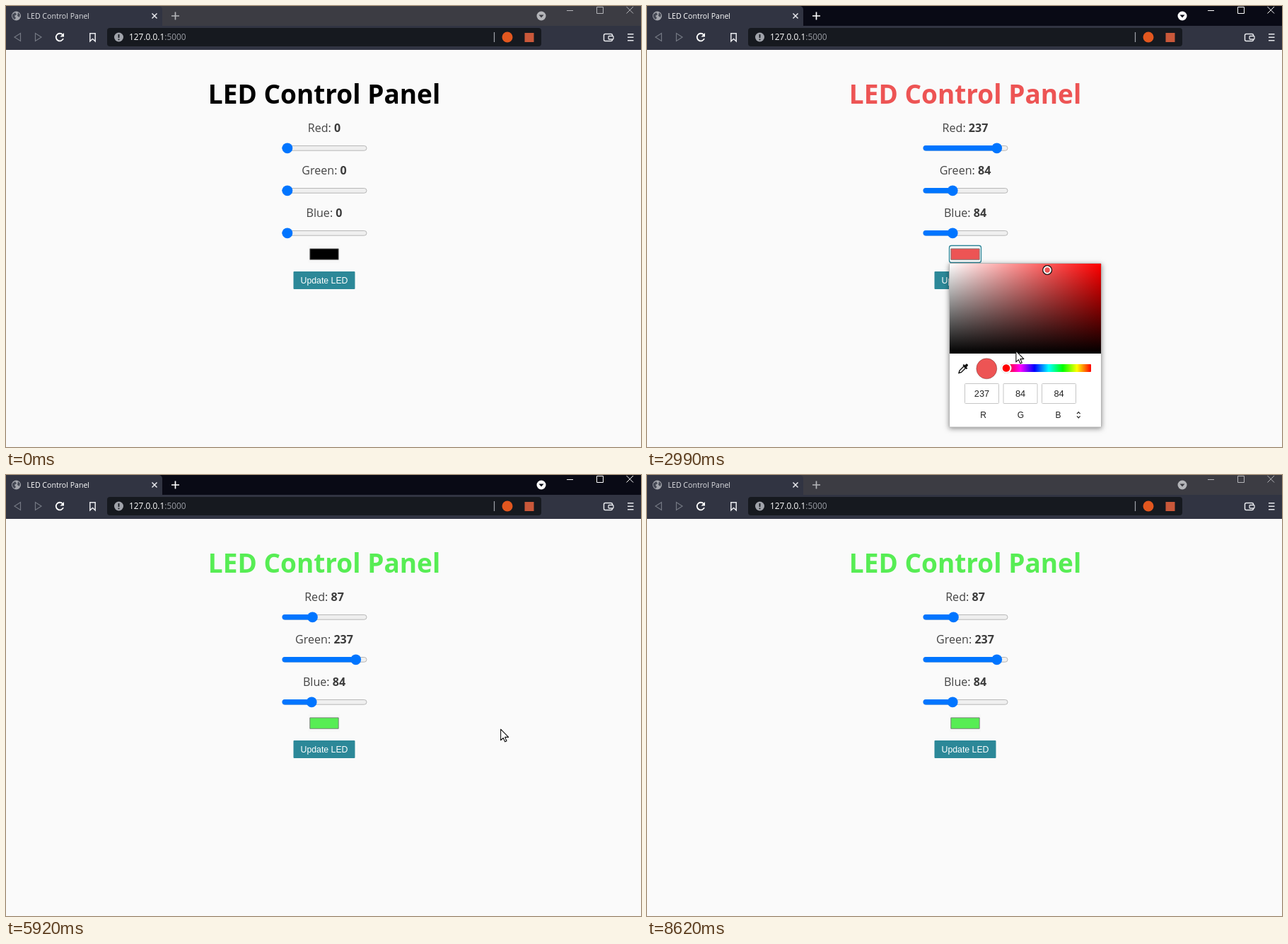
An HTML page with a canvas that plays this animation: 898 by 623 pixels, repeating every 8.68 s.

```html
<!DOCTYPE html>
<html lang="en">
<head>
<meta charset="utf-8">
<title>LED Control Panel</title>
<style>
html, body { margin: 0; width: 100%; height: 100%; overflow: hidden; background: #fafafa; }
canvas { display: block; }
</style>
</head>
<body>
<canvas id="stage" width="898" height="623"></canvas>
<script>
const ctx = document.getElementById('stage').getContext('2d');
const LOOP = 8680;
const SANS = '"Open Sans", "Noto Sans", sans-serif';
const ARIAL = '"Liberation Sans", Arial, sans-serif';

// Pointer glides: start, end, destination. It rests in between.
const ENTRY = { x: 640, y: 568 };
const glides = [
  [130, 760, 452, 350],    // to the colour field
  [1030, 1330, 436, 480],  // into the shade area
  [1400, 1800, 524, 434],
  [1870, 2290, 566, 374],
  [2500, 2570, 569, 369.8],
  [2640, 3130, 510.4, 516], // to the hue bar
  [3280, 3690, 551.7, 521],
  [3760, 4110, 589.1, 525],
  [4900, 5050, 590.8, 525],
  [5380, 5660, 718, 357],  // out of the picker
  [5810, 6470, 474, 386.5], // to the button
  [6740, 7310, 601, 155],  // to OK
  [7660, 8220, 822, 598]
];
const shadeDrag = [1400, 2640], hueDrag = [3280, 5120];

const limit = (x, a, b) => Math.max(a, Math.min(b, x));
const clamp = x => limit(x, 0, 1);
const between = (t, [a, b]) => t >= a && t < b;

function pointerAt(t) {
  let { x, y } = ENTRY;
  for (const [start, end, toX, toY] of glides) {
    const u = clamp((t - start) / (end - start)), e = u * u * (3 - 2 * u);
    x += (toX - x) * e;
    y += (toY - y) * e;
  }
  return { x, y };
}

function hsv(h, s, v) {
  return [5, 3, 1].map(n => {
    const k = (n + h / 60) % 6;
    return Math.round(255 * v * (1 - s * clamp(Math.min(k, 4 - k))));
  });
}
const css = c => `rgb(${c})`;

// The pointer drags both picker handles, so the colour follows from its path.
function colorAt(t) {
  const grip = pointerAt(limit(t, ...shadeDrag)), slide = pointerAt(limit(t, ...hueDrag));
  const picked = t >= shadeDrag[0];
  const s = picked ? clamp((grip.x - 430.9) / 214) : 0;
  const v = picked ? clamp(1 - (grip.y - 360.8) / 127) : 0;
  const p = clamp((slide.x - 510.4) / 120), hue = 360 * (1 - p);
  return { s, v, p, hue, rgb: hsv(hue, s, v) };
}

function paint(path, fill, stroke, width = 1) {
  if (fill) { ctx.fillStyle = fill; ctx.fill(path); }
  if (stroke) { ctx.strokeStyle = stroke; ctx.lineWidth = width; ctx.stroke(path); }
}
function box(x, y, w, h, r, fill, stroke, width) {
  const p = new Path2D();
  p.roundRect(x, y, w, h, r);
  paint(p, fill, stroke, width);
}
function disc(x, y, r, fill, stroke, width) {
  const p = new Path2D();
  p.arc(x, y, r, 0, 7);
  paint(p, fill, stroke, width);
}
const draw = (d, fill, stroke, width) => paint(new Path2D(d), fill, stroke, width);

function text(s, x, y, font, color, align = 'left') {
  ctx.font = font;
  ctx.fillStyle = color;
  ctx.textAlign = align;
  ctx.fillText(s, x, y);
}

// A shadow around a shape only, so that it does not darken a translucent fill.
function shadowAround(d, blur, alpha) {
  ctx.save();
  ctx.clip(new Path2D('M0 0H898V623H0Z' + d), 'evenodd');
  ctx.shadowBlur = blur;
  ctx.shadowOffsetY = 2;
  ctx.shadowColor = `rgba(0,0,0,${alpha})`;
  draw(d, '#000');
  ctx.restore();
}

function drawBrowser(active) {
  const bar = active ? '#090a15' : '#3c3c43';
  const ink = active ? '#fff' : '#b4b5b9', bright = '#e8e9ed', dim = '#747883';
  box(0, 0, 898, 28, 0, bar);
  box(0, 28, 898, 34, 0, '#313442');
  box(0, 0, 221, 30, [0, 5, 0, 0], '#313442');

  disc(14.5, 14, 6.5, '#a3a5ac');
  draw('M9 12L13 9L15 12L12 14L14 17L12 19Q8 16 9 12ZM17 9L20 12L19 16L16 14Z', '#454955');
  text('LED Control Panel', 29.5, 17.5, '500 10.6px ' + SANS, active ? '#fff' : '#dedfe3');
  draw('M206.5 10.5L213.5 17.5M213.5 10.5L206.5 17.5', null, bright, 1.5);
  draw('M234 14H245M239.5 8.5V19.5', null, ink, 1.7);

  disc(757, 14, 6.5, ink);
  draw('M753.5 12.5H760.5L757 16.5Z', bar);
  draw('M793 6.5H802M835.5 1.5H844.5V10.5H835.5ZM877.5 1L887 10.5M887 1L877.5 10.5', null, ink);

  draw('M20.5 38.5V49.5L12 44ZM41.5 38.5V49.5L50 44Z', null, dim, 1.2);
  draw('M80 40.5A5.3 5.3 0 1 0 81 46', null, '#fff', 1.8);
  draw('M82 38V43.5H76.5Z', '#fff');
  draw('M118.8 38.8H126.2V49.8L122.5 46.5L118.8 49.8Z', null, bright, 1.5);

  box(143, 31, 614, 26, 4, '#16191f');
  disc(159.5, 44, 6.5, '#a0a3aa');
  draw('M159.5 40V45M159.5 46.5V48.3', null, '#16191f', 1.8);
  const font = '500 11.9px ' + SANS;
  text('127.0.0.1', 174, 48.3, font, '#fff');
  text(':5000', 174 + ctx.measureText('127.0.0.1').width, 48.3, font, '#989ba2');
  draw('M690.5 37V51', null, '#a0a3aa', 1.2);
  disc(709, 44, 7.5, '#e2571f');
  box(733.5, 38, 13, 13, 0, '#c9583a');

  box(845.5, 39.5, 12, 10, 2, null, bright, 1.5);
  box(852, 42.5, 7, 4.5, 1, '#313442', bright, 1.3);
  draw('M879 39.7H887.5M879 44.2H887.5M879 48.7H887.5', null, bright, 1.5);
}

function drawSlider(name, value, y) {
  const label = name + ': ', normal = '500 16.1px ' + SANS, bold = 'bold 16.1px ' + SANS;
  ctx.font = normal;
  const w = ctx.measureText(label).width;
  ctx.font = bold;
  const x = 450 - (w + ctx.measureText(value).width) / 2;
  text(label, x, y, normal, '#444');
  text(value, x + w, y, bold, '#3c3c3c');

  const knob = 397.9 + 104.2 * value / 255;
  box(391, y + 19.5, 119, 6.7, 3.4, '#efefef', '#b2b2b2', .9);
  box(390.5, y + 19.1, knob - 390.5, 7.4, 3.7, '#0075ff');
  disc(knob, y + 22.8, 7.4, '#0075ff');
}

function drawPage(t, rgb) {
  box(0, 62, 898, 561, 0, '#fafafa');
  text('LED Control Panel', 450, 138, 'bold 37px ' + SANS, css(rgb), 'center');
  ['Red', 'Green', 'Blue'].forEach((name, i) => drawSlider(name, rgb[i], 178 + 60 * i));

  if (between(t, [1030, 5810])) box(427.5, 338.5, 45, 24, 3, '#fff', '#2b8496', 1.3);
  else box(427.5, 338.5, 45, 24, 0, '#f7f7f7');
  box(429.8, 342.9, 40.4, 15.4, 0, css(rgb), '#777', .9);

  const hover = t < 8550 ? clamp((t - 6350) / 150) : 0;
  const teal = [44, 136, 152], plum = [153, 43, 98];
  box(406.5, 375, 87, 25, 1, css(teal.map((c, i) => Math.round(c + (plum[i] - c) * hover))));
  text('Update LED', 450, 391.7, '12.3px ' + ARIAL, '#fff', 'center');
}

function drawPicker(t) {
  const { s, v, p, hue, rgb } = colorAt(t), pure = css(hsv(hue, 1, 1));
  shadowAround('M427 363H643V595H427Z', 7, .45);
  box(427.5, 363.5, 215, 231.5, 1, '#fff', '#b5b5b5');

  const across = ctx.createLinearGradient(428, 0, 642, 0);
  across.addColorStop(0, '#fff');
  across.addColorStop(1, pure);
  box(428, 364, 214, 127, 0, across);
  const down = ctx.createLinearGradient(0, 364, 0, 491);
  down.addColorStop(0, 'rgba(0,0,0,0)');
  down.addColorStop(1, '#000');
  box(428, 364, 214, 127, 0, down);

  const bar = ctx.createLinearGradient(508, 0, 628, 0);
  for (let i = 0; i <= 6; i++) bar.addColorStop(i / 6, `hsl(${360 - 60 * i} 100% 50%)`);
  box(508, 506, 120, 11, 1, bar);

  const onHue = t >= hueDrag[0];
  const hx = 428 + 214 * s, hy = 364 + 127 * (1 - v), kx = 508 + 120 * p;
  if (!onHue) disc(hx, hy, 6.2, null, '#111', 1.6);
  disc(hx, hy, 4.7, null, '#fff', 2);
  disc(kx, 511.5, onHue ? 9.3 : 7.6, onHue ? '#000' : '#ccc');
  disc(kx, 511.5, 7.2, '#fff');
  disc(kx, 511.5, 5.3, pure);

  disc(480.3, 512.3, 14.5, css(rgb), 'rgba(0,0,0,.25)');
  draw('M441 518.5L442 515L448 509L450.5 511.5L444.5 517.5Z', null, '#111', 1.4);
  draw('M446.5 507.5L448 506L449.5 507.5L451.5 505.5Q454 505 454 508L451.8 510.2L453.3 511.7L451.8 513.2Z', '#111');

  rgb.forEach((value, i) => {
    const x = 473.5 + 54.5 * i;
    box(x - 24, 533.5, 48, 28, 1, '#fff', '#c6c6c6');
    text(value, x, 552, '12.8px ' + ARIAL, '#222', 'center');
    text('RGB'[i], 475.5 + 53 * i, 581.7, '12px ' + ARIAL, '#222', 'center');
  });
  draw('M608 576.2L610.3 573.7L612.6 576.2M608 579.3L610.3 581.8L612.6 579.3', null, '#222', 1.2);
}

// Drops in from above, slightly tilted back.
function drawDialog(a) {
  const b = 1 - a, dy = -29 * b, tilt = 3.5 * b;
  const shape = `M${243 + tilt} ${62 - 38 * b}H${657 - tilt}L${657 + tilt} ${178 + dy}H${243 - tilt}Z`;
  ctx.save();
  ctx.globalAlpha = a;
  shadowAround(shape, 6, .6);
  draw(shape, '#29292c');
  ctx.globalAlpha = Math.sqrt(a);
  ctx.translate(0, dy);
  text('127.0.0.1:5000 says', 258.5, 88.5, '500 12.6px ' + SANS, '#fff');
  text('Successfully updated the LED', 258, 114, '500 11.2px ' + SANS, '#fff');
  box(583, 133.5, 58, 29, 14.5, null, '#8a4d3f', 2);
  box(584, 134.5, 56, 27, 13.5, '#ff8a6b');
  text('OK', 611.5, 152, 'bold 10.5px ' + SANS, '#fff', 'center');
  ctx.restore();
}

const ARROW = 'M0 0V15.5L3.6 12.2L6 17.6L8.4 16.5L6 11.2H11Z';
const HAND = 'M-1.6 1.5Q0 -1 1.6 1.5V8Q5 7 5.4 9.5Q8 8.5 8.6 11Q11 10.5 11 13V17L9.5 22H1' +
  'L-4.5 14Q-4.5 11.5 -1.6 13.5Z';

function drawPointer(t) {
  const { x, y } = pointerAt(t);
  ctx.save();
  ctx.translate(x, y);
  if (between(t, shadeDrag)) disc(0, 0, 11, 'rgba(230,200,30,.75)');
  if (between(t, hueDrag)) {
    ctx.globalCompositeOperation = 'multiply';
    disc(0, 0, 11, 'rgba(245,230,70,.7)');
    ctx.globalCompositeOperation = 'source-over';
  }
  ctx.lineJoin = 'round';
  draw(between(t, [6360, 6760]) ? HAND : ARROW, '#fff', '#111', 1.1);
  ctx.restore();
}

function render(t) {
  drawPage(t, colorAt(t - 70).rgb); // the page trails the picker
  drawBrowser(between(t, [800, 8550]));
  if (between(t, [1030, 5810])) drawPicker(t);
  const open = Math.min(clamp((t - 6470) / 200), clamp((7800 - t) / 170));
  if (open > 0) drawDialog(open);
  if (between(t, [130, 8220])) drawPointer(t);
}

const start = performance.now();
(function tick() {
  render((performance.now() - start) % LOOP);
  requestAnimationFrame(tick);
})();
</script>
</body>
</html>
```
